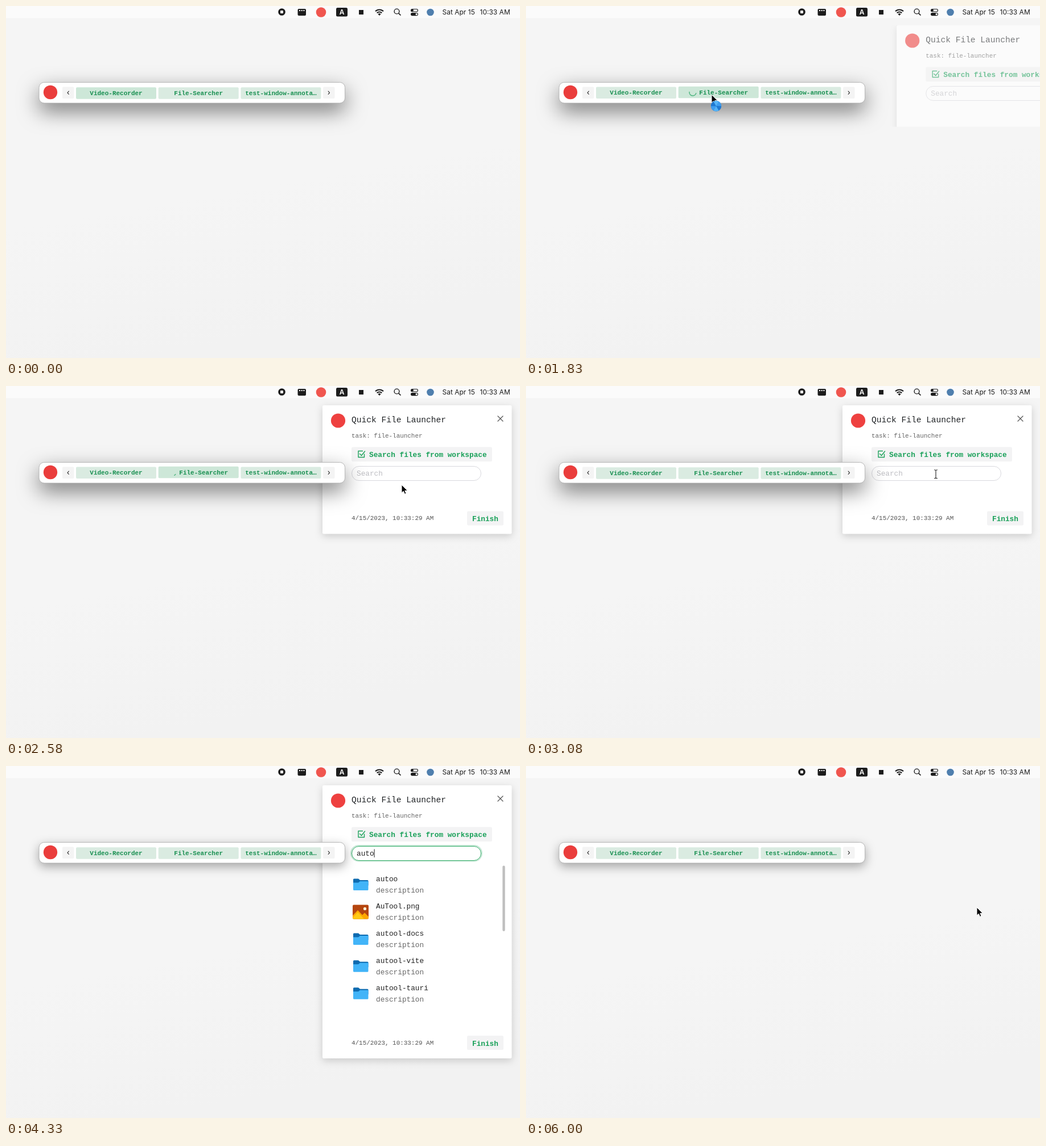
An HTML page that plays this animation: 903x620 px, repeating every 7.08 s.

```html
<!DOCTYPE html>
<html lang="en">
<head>
<meta charset="utf-8">
<title>Quick File Launcher</title>
<style>
  html, body { margin: 0; width: 100%; height: 100%; overflow: hidden; background: #f5f5f5; }
  svg { display: block; }
  text { font: 12.75px "Liberation Mono", "Courier New", monospace; white-space: pre; }
  .clock { font: 12px Inter, "Open Sans", sans-serif; fill: #1c1c1c; }
  .small { font-size: 10.93px; }
  .title { font-size: 14.57px; fill: #1f2225; }
  .strong { font-weight: bold; fill: #18a058; }
  .tab { font-size: 11px; font-weight: bold; fill: #178f50; text-anchor: middle; }
  .line { fill: none; stroke-linecap: round; stroke-linejoin: round; }
  .card { filter: drop-shadow(0 4px 7px rgba(0,0,0,.17)); }
</style>
</head>
<body>
<svg width="903" height="620" viewBox="0 0 903 620">
  <defs>
    <linearGradient id="sky" x1="0" y1="0" x2=".25" y2="1">
      <stop offset=".6" stop-color="#f5f5f5"/><stop offset="1" stop-color="#f2f2f2"/>
    </linearGradient>
    <clipPath id="reveal"><rect id="revealBox" x="530" y="0" width="380"/></clipPath>
    <g id="folder">
      <path d="M0 1.5Q0 0 1.5 0H9L12 2.5H25Q26.5 2.5 26.5 4V12H0Z" fill="#0e6bb0"/>
      <path d="M0 7H9L12 4.5H26.5V19Q26.5 20.5 25 20.5H1.5Q0 20.5 0 19Z" fill="#42b4f8"/>
    </g>
    <g id="picture">
      <rect width="28" height="25" rx="2" fill="#b5460f"/>
      <path d="M0 19L9 9.500L17 18L21 14L28 21V23Q28 25 26 25H2Q0 25 0 23Z" fill="#ffa800"/>
      <path d="M0 23L9 13L20 25H2Q0 25 0 23Z" fill="#ffc914"/>
      <circle cx="21.500" cy="7" r="2.600" fill="#fff3d6"/>
    </g>
  </defs>

  <rect width="903" height="620" fill="url(#sky)"/>

  <g id="menu" fill="#1d1d1d">
    <rect width="903" height="21.500" fill="#fbfbfb"/>
    <circle cx="484.500" cy="10.500" r="6.300"/>
    <rect x="482" y="8" width="5" height="5" rx="1" fill="#fff"/>
    <rect x="512.500" y="5" width="14.500" height="12" rx="2"/>
    <path d="M515 8h9.500" stroke="#fff" stroke-width="1.800" stroke-dasharray="2 1.700"/>
    <circle cx="553.500" cy="11" r="8.800" fill="#f0564f"/>
    <rect x="580" y="3" width="20" height="15.500" rx="2.500"/>
    <text x="590" y="15.300" text-anchor="middle" class="clock" style="fill:#fff;font-weight:600">A</text>
    <rect x="620" y="7" width="8" height="8"/>
    <g class="line" stroke="#1d1d1d" stroke-width="2.100" style="stroke-linecap:butt">
      <path d="M649 9.300a10 10 0 0 1 14 0M651.700 12.200a6.200 6.200 0 0 1 8.600 0"/>
      <circle cx="686.500" cy="9.500" r="4.400" stroke-width="1.400"/>
      <path d="M689.800 12.800l3.700 3.700" stroke-width="1.700"/>
      <rect x="711.500" y="5.500" width="12" height="4.300" rx="2.150" stroke-width="1.100"/>
    </g>
    <path d="M656 17l-2.600-2.800a3.700 3.700 0 0 1 5.200 0z"/>
    <circle cx="713.700" cy="7.650" r="2.200"/>
    <rect x="711" y="11.700" width="13" height="5.500" rx="2.750"/>
    <circle cx="721.200" cy="14.450" r="1.700" fill="#fff"/>
    <circle cx="745.500" cy="11" r="6.300" fill="#4f7fae"/>
    <text class="clock" x="766.500" y="14.800">Sat Apr 15</text>
    <text class="clock" x="832.500" y="14.800">10:33 AM</text>
  </g>

  <g id="panel" clip-path="url(#reveal)">
    <rect id="card" class="card" x="556" y="34" width="332.500" rx="2.500" fill="#fff"/>
    <circle cx="583.500" cy="61" r="12.600" fill="#ee4140"/>
    <text class="title" x="607" y="64">Quick File Launcher</text>
    <text class="small" x="607" y="91" fill="#666">task: file-launcher</text>
    <path class="line" d="M864 53l9 9M873 53l-9 9" stroke="#555" stroke-width="1.200"/>
    <rect x="607" y="107.500" width="247" height="25.500" rx="2.500" fill="#f3f3f4"/>
    <path class="line" d="M629.500 120v5.500h-10.500v-11h7.500M621.500 119.500l3 3l6-7.500" stroke="#18a058" stroke-width="1.400"/>
    <text class="strong" x="638" y="125">Search files from workspace</text>
    <rect id="glow" x="606" y="140" width="230" height="27.500" rx="13.700" fill="none" stroke="#18a058" stroke-opacity=".25" stroke-width="2"/>
    <rect id="field" x="607.500" y="141.500" width="227" height="25" rx="12.500" fill="#fff"/>
    <text id="query" x="616" y="158"></text>
    <rect id="caret" y="146.500" width="1" height="14.500" fill="#222"/>
    <g id="results"></g>
    <g id="footer">
      <text class="small" x="607" y="236" fill="#555">4/15/2023, 10:33:29 AM</text>
      <rect x="810" y="220.500" width="64" height="25" rx="2.500" fill="#f3f3f4"/>
      <text class="strong" x="819" y="238">Finish</text>
    </g>
  </g>

  <g id="bar">
    <rect id="plate" x="58" y="134.500" width="537.500" height="36.500" rx="9" fill="#fff" stroke="#a9a9a9" stroke-width=".8"/>
    <circle cx="78" cy="152" r="12.200" fill="#ea3d3c"/>
    <rect x="99" y="142.500" width="20.500" height="20.500" rx="2" fill="#f4f4f4"/>
    <rect x="557" y="142.500" width="20.500" height="20.500" rx="2" fill="#f4f4f4"/>
    <path class="line" d="M110.300 150.200l-2.300 2.600l2.300 2.600M566.200 150.200l2.300 2.600l-2.300 2.600" stroke="#333" stroke-width="1.200"/>
    <g id="tabs"></g>
    <path id="spinner" class="line" stroke="#18a058" stroke-opacity=".7" stroke-width="1.500"/>
  </g>

  <g id="cursor">
    <path id="arrow" d="M0 0V14.300L3.300 11.300L5.600 16.400L8 15.300L5.800 10.400H10.300Z" fill="#000" stroke="#fff" stroke-width="1"/>
    <g id="hand" transform="translate(-4.500 -.5)">
      <path class="line" d="M4.200 10.500V2Q4.200 .6 5.400 .6T6.600 2V6.800Q7.600 5.700 8.800 6.900Q10 6 11 7.300Q12.900 6.700 13 8.600V11.500L11.800 14V16H5.400V14.400L1.200 10Q.2 8.600 1.300 8T4.200 10.500Z" fill="#fff" stroke="#111" stroke-width="1.200" style="fill:#fff"/>
      <path class="line" d="M7 10.500v2.600M9 10.500v2.600M11 10.500v2.600" stroke="#111" stroke-width=".8"/>
    </g>
    <path id="beam" class="line" d="M-2.500 -7.500Q0 -7.500 0 -6V6Q0 7.500 -2.500 7.500M2.500 -7.500Q0 -7.500 0 -6M0 6Q0 7.500 2.500 7.500" stroke="#222" stroke-width="1.100"/>
    <g id="ball"></g>
  </g>
</svg>
<script>
const LOOP = 7080, FRAME = 1000 / 12;
const NS = 'http://www.w3.org/2000/svg';
const el = id => document.getElementById(id);
const clamp = v => Math.max(0, Math.min(1, v));
const show = (id, on) => el(id).setAttribute('visibility', on ? 'visible' : 'hidden');
const set = (node, attrs) => { for (const k in attrs) node.setAttribute(k, attrs[k]); return node; };
function add(parent, tag, attrs, text = '') {
  const node = set(document.createElementNS(NS, tag), attrs);
  node.textContent = text;
  return parent.appendChild(node);
}

// Toolbar tabs
const tabs = ['Video-Recorder', 'File-Searcher', 'test-window-annota…'].map((name, i) => {
  const x = 123 + i * 144.7;
  return {
    mid: x + 70.5,
    box: add(el('tabs'), 'rect', { x, width: 141, height: 20.5, rx: 2 }),
    label: add(el('tabs'), 'text', { class: 'tab' }, name)
  };
});

// Search results
const ROW = 48;
const rows = ['autoo', 'AuTool.png', 'autool-docs', 'autool-vite', 'autool-tauri'].map((name, i) => {
  const g = add(el('results'), 'g', { transform: `translate(0 ${185 + i * ROW - i * 0.05})` });
  const back = add(g, 'rect', { x: 607, y: 0, width: 272, height: ROW, fill: '#f0f0f2' });
  const image = name.endsWith('.png');
  add(g, 'use', { href: image ? '#picture' : '#folder', x: image ? 609 : 610, y: image ? 11.5 : 13.5 });
  add(g, 'text', { x: 650, y: 18, fill: '#222' }, name);
  add(g, 'text', { x: 650, y: 38, fill: '#666' }, 'description');
  return back;
});
add(el('results'), 'rect', { x: 872.3, y: 175.5, width: 4.4, height: 115.5, rx: 2.2, fill: '#bfbfbf' });

// Busy ball
const polar = (r, deg) => [r * Math.cos(deg * Math.PI / 180), r * Math.sin(deg * Math.PI / 180)];
add(el('ball'), 'circle', { r: 9.3, fill: '#2383dc' });
for (let i = 0; i < 6; i++) {
  const a = polar(9, i * 60), b = polar(9, i * 60 + 60);
  add(el('ball'), 'path', { d: `M0 0L${a}A9 9 0 0 1 ${b}Z`, fill: ['#3d9df0', '#1f78d0', '#55b4f7'][i % 3] });
}

// Time, x, y of the pointer's tip
const path = [[250, 383, 505], [920, 325, 165], [1080, 326, 157], [2080, 326, 156],
  [2580, 695, 174], [2830, 720, 155], [4750, 720, 160], [5250, 792, 249]];
function pointer(t) {
  let i = path.findIndex(p => p[0] > t);
  if (i < 0) return path[path.length - 1].slice(1);
  if (i === 0) return path[0].slice(1);
  const a = path[i - 1], b = path[i], u = (t - a[0]) / (b[0] - a[0]), e = u * u * (3 - 2 * u);
  return [a[1] + (b[1] - a[1]) * e, a[2] + (b[2] - a[2]) * e];
}

// Last entry whose time has come
const at = (steps, t) => steps.reduce((v, s) => t >= s[0] ? s[1] : v, null);
const shapes = [[250, 'arrow'], [990, 'hand'], [1410, 'arrow'], [2740, 'beam'], [3660, ''], [4740, 'arrow'], [5490, 'arrow']];
const typed = [[0, ''], [3820, 'a'], [3910, 'au'], [3990, 'aut'], [4325, 'auto']];

function drawPanel(t, row) {
  const inU = clamp((t - 1694) / 300), outU = clamp((t - 5400) / 300);
  const moving = inU < 1 || outU > 0;
  const tall = t >= 3990;
  const height = tall ? 481 : 226.5;
  const shift = 332 * ((1 - inU) ** 2 + outU ** 2);
  const fade = (1 - (1 - inU) ** 1.4) * (1 - outU);
  set(el('panel'), { transform: `translate(${shift} 0)`, opacity: fade });
  set(el('card'), { height });
  const open = outU > 0 ? height : height * Math.min(1, inU * 1.7);
  set(el('revealBox'), { y: moving ? 34 : 0, height: moving ? open : 620 });
  set(el('footer'), { transform: `translate(0 ${tall ? 254.5 : 0})` });
  el('results').style.display = tall ? '' : 'none';
  rows.forEach((back, i) => set(back, { opacity: i === row ? 1 : 0 }));

  const focus = t >= 3325, word = at(typed, t);
  set(el('field'), { stroke: focus ? '#36ad6a' : '#d9d9de' });
  set(el('glow'), { opacity: focus && t < 4740 ? 1 : 0 });
  el('query').textContent = word || 'Search';
  set(el('query'), { fill: word ? '#222' : '#bdbdc2' });
  set(el('caret'), { x: 616 + word.length * 7.65, opacity: focus && t < 4740 ? 1 : 0 });
}

function drawBar(t) {
  const busy = t >= 1490 && t < 2990, active = t < 3325;
  el('plate').style.filter = active
    ? 'drop-shadow(0 14px 18px rgba(0,0,0,.5))'
    : 'drop-shadow(0 6px 9px rgba(0,0,0,.33))';
  const dark = [t < 1490, t >= 990 && t < 2990, false];
  tabs.forEach((tab, i) => {
    const spin = busy && i === 1, lift = spin ? 1.5 : busy ? 0.8 : 0;
    set(tab.box, { y: 143.3 - lift, fill: dark[i] ? '#cde7d8' : '#daebe1' });
    set(tab.label, { x: tab.mid + (spin ? 9 : 0), y: 157.2 - lift });
  });
  show('spinner', busy);
  const from = 15 + (t - 1830) * 0.507;
  const span = 25 + 72 * (1 - Math.cos(2 * Math.PI * (t - 2580) / 1600));
  const [ax, ay] = polar(6, from), [bx, by] = polar(6, from + span);
  set(el('spinner'), { d: `M${293 + ax} ${152 + ay}A6 6 0 0 1 ${293 + bx} ${152 + by}` });
}

function draw(t) {
  const [x, y] = pointer(t);
  const row = t >= 4740 && t < 5720 && y >= 185 ? Math.floor((y - 185) / ROW) : -1;
  const shape = row >= 0 && t < 5490 ? 'hand' : at(shapes, t);
  for (const id of ['arrow', 'hand', 'beam']) show(id, id === shape);
  show('ball', t >= 1570 && t < 2160);
  set(el('ball'), { transform: `translate(8 20) rotate(${t * 0.36})` });
  set(el('cursor'), { transform: `translate(${x} ${y})` });
  drawPanel(t, row);
  drawBar(t);
}

const start = performance.now();
function tick() {
  const t = (performance.now() - start) % LOOP;
  draw(Math.floor((t + 5) / FRAME) * FRAME);
  requestAnimationFrame(tick);
}
tick();
</script>
</body>
</html>
```
